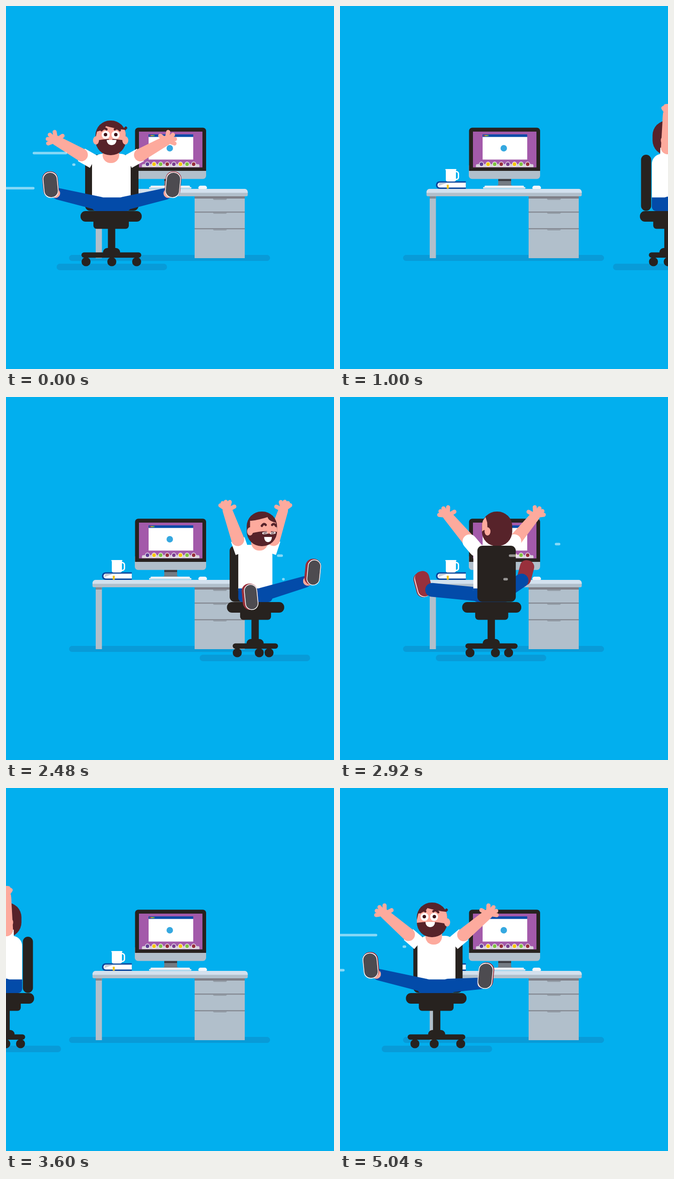
Recreate the animation shown at these times as an HTML page with a canvas. Size 713 by 786 pixels, loop 5080 ms.

```html
<!DOCTYPE html>
<html lang="en">
<head>
<meta charset="utf-8">
<title>Office chair spin</title>
<style>
html, body { margin: 0; width: 100%; height: 100%; overflow: hidden; background: #02afee; }
canvas { display: block; }
</style>
</head>
<body>
<canvas id="stage" width="713" height="786"></canvas>
<script>
const ctx = document.getElementById('stage').getContext('2d');
const LOOP = 5080, STEP = 40, SPEED = 0.4834, TURN = 0.45;
const C = {
  sky: '#02afee', shade: '#089bd8', black: '#27221f', steel: '#b1bfcb', light: '#d3e1ee',
  dark: '#858a93', blue: '#034ba9', skin: '#fdaa9d', hair: '#57232a', pupil: '#3d1218',
  shoe: '#98303c', sole: '#4d4b50', white: '#fff', purple: '#a35aaa'
};

function box(x, y, w, h, color, r = 0) {
  ctx.fillStyle = color;
  ctx.beginPath();
  ctx.roundRect(x, y, w, h, r);
  ctx.fill();
}
function disc(x, y, rx, color, ry = rx) {
  ctx.fillStyle = color;
  ctx.beginPath();
  ctx.ellipse(x, y, rx, ry, 0, 0, Math.PI * 2);
  ctx.fill();
}
function stroke(x1, y1, x2, y2, width, color, cap = 'round') {
  ctx.strokeStyle = color;
  ctx.lineWidth = width;
  ctx.lineCap = cap;
  ctx.beginPath();
  ctx.moveTo(x1, y1);
  ctx.lineTo(x2, y2);
  ctx.stroke();
}
// Limb with different radii at its two round ends
function taper(x1, y1, r1, x2, y2, r2, color) {
  const a = Math.atan2(y2 - y1, x2 - x1), q = Math.PI / 2;
  ctx.fillStyle = color;
  ctx.beginPath();
  ctx.arc(x1, y1, r1, a + q, a - q);
  ctx.arc(x2, y2, r2, a - q, a + q);
  ctx.fill();
}

function drawMonitor() {
  box(344, 374, 28, 15, '#747b83');
  box(344, 374, 28, 5, '#3c3d42');
  box(341, 388, 34, 4, '#747b83', 2);
  box(280, 345, 155, 29.5, C.steel, [0, 0, 7, 7]);
  box(280.5, 263.5, 154.5, 93.5, C.black, [7, 7, 0, 0]);
  box(289, 272, 138, 77.5, C.purple);
  box(310, 278, 97, 54.5, C.white);
  box(310, 278, 97, 5.5, C.blue);
  ['#e0473c', '#f8c31c', '#7dc243'].forEach((c, i) => disc(313.5 + i * 3.8, 280.7, 1.6, c));
  disc(356, 308, 7, '#35a8e0');
  box(295.5, 342.5, 125, 6.5, '#d8d3dc', [3, 3, 0, 0]);
  ['#5f3d94', '#f7c70f', '#7fc241', '#97303c', '#78408f', '#f7c70f', '#7fc241', '#97303c'].forEach((c, i) => {
    disc(307.5 + i * 14.35, 342.5, 5.4, '#f1ecf2');
    disc(307.5 + i * 14.35, 342.5, 3.9, c);
  });
}

function drawDesk() {
  box(137, 539, 437, 13, C.shade, 6.5);
  box(195, 410, 13.5, 136, C.steel);
  box(195, 411, 13.5, 6, C.dark);
  box(410, 410, 109, 136, C.steel);
  box(410, 411, 109, 6, '#7f8088');
  [446, 482].forEach(y => box(410, y - 1, 109, 2.5, C.dark));
  [417, 447, 483].forEach(y => box(450, y, 30, 3, '#949da7', [0, 0, 3, 3]));
  drawMonitor();
  box(188, 396, 337.5, 16, C.steel, [7, 7, 3, 3]);
  box(188, 396, 337.5, 8.5, C.light, [7, 7, 0, 0]);
  box(314, 389, 86, 4, '#f2f5f9', 2);
  box(311, 392, 92, 3.5, '#dbe4ed', 1);
  box(418, 389, 19, 7, '#f4f6fa', [8, 8, 3, 3]);

  box(208.5, 379.5, 65, 16.5, '#0b469c', [8, 0, 0, 8]);
  box(212, 382.5, 61.5, 10.5, C.white, [5, 0, 0, 5]);
  ctx.fillStyle = '#c5ccd6';
  ctx.beginPath();
  ctx.moveTo(213, 390);
  ctx.lineTo(216, 383);
  ctx.lineTo(233, 383);
  ctx.fill();
  box(232, 387, 4.5, 8.5, '#f7c51d');
  ctx.strokeStyle = C.white;
  ctx.lineWidth = 3;
  ctx.beginPath();
  ctx.roundRect(246, 358.5, 11.5, 17, 5);
  ctx.stroke();
  box(230, 354, 22, 26, C.white, [1, 1, 4, 4]);
  box(229, 353, 24, 2.5, C.white, 1);
}

// Geometry for one heading; 0 faces the viewer, 90 faces the right edge
function poseAt(degrees) {
  const yaw = ((degrees + 180) % 360 + 360) % 360 - 180;
  const a = yaw * Math.PI / 180, cos = Math.cos(a), sin = Math.sin(a);
  return { yaw, cos, sin, side: Math.abs(sin), flat: cos * cos, twist: Math.sin(2 * a) };
}

function drawBase(p) {
  const w = 41 + 24 * p.flat;
  box(-120, 558, 240, 14, C.shade, 7);
  box(-8.5, 480, 16, 50, C.black);
  box(-19, 524, 37, 14, C.black, [9, 9, 0, 0]);
  box(-w - 1, 533.5, 2 * w, 11.5, C.black, 5.7);
  [-w + 9 + 10 * Math.abs(p.twist), 10 * p.twist, w - 11].forEach(x => disc(x, 553.7, 9.8, C.black));
  const seat = 60 + 6.5 * p.flat, block = 31 + 7.5 * p.flat;
  box(-block - 1.5, 460, block * 2, 22.5, C.black, 7);
  box(-seat - 1.5, 444, seat * 2, 23, C.black, 11);
}

function drawBackrest(p) {
  const w = 22 + 94 * p.flat;
  const x = -48 * Math.sign(p.sin) * p.side ** 2.6;
  box(x - w / 2, 322, w, 121.5, C.black, 11);
}

function drawTorso(p) {
  const w = 34.5 + 7.5 * p.flat;
  box(-w - 1, 320, 2 * w, 100, C.white, [22, 22, 0, 0]);
  box(-w - 1, 414.5, 2 * w, 29.5, C.blue, [0, 0, 9, 9]);
  box(8.4 * p.twist - 20, 305, 36, 17 + 18 * Math.max(0, p.cos), C.skin, [0, 0, 17, 17]);
}

function drawArm(p, s) {
  const dir = s * Math.sign(p.cos || 1), c = Math.abs(p.cos), behind = p.cos < 0;
  const sx = dir * 38 * Math.sqrt(c) - 2, sy = 337 + 9 * Math.min(0, p.cos);
  const hx = dir * (123 - 3 * p.cos) * c ** 1.3 - 1, hy = 291 - 56 * p.side ** 0.95;
  const angle = Math.atan2(hy - sy, hx - sx), cuff = behind ? 22 : 30;
  const ex = sx + cuff * Math.cos(angle), ey = sy + cuff * Math.sin(angle);
  const spread = 0.3 + 0.7 * c;
  const sleeve = cap => stroke(sx, sy, ex, ey, 31, C.white, cap);
  if (!behind) sleeve('butt');
  taper(ex, ey, 14, hx, hy, 10.5, C.skin);
  [-50, -20, 12, 50, 115].forEach((deg, i) => {
    const f = angle - dir * deg * spread * Math.PI / 180, len = i === 4 ? 17 : 18.5;
    stroke(hx, hy, hx + len * Math.cos(f), hy + len * Math.sin(f), 9, C.skin);
  });
  if (behind) sleeve('round');
}

function legAt(p, s) {
  const reach = 60 + 40 * p.side ** 6, spread = 140 - 7 * p.cos;
  const near = -s * spread * p.sin;
  return {
    s,
    x: s * spread * p.cos * Math.abs(p.cos) ** 0.3 + reach * p.sin,
    y: 387 + (near > 0 ? near * (0.33 + 0.15 * p.cos) : near * 0.07),
    z: reach * p.cos + near
  };
}

function drawFoot(p, leg) {
  const front = p.cos > -0.15, outward = Math.sign(leg.x || 1);
  ctx.save();
  ctx.translate(leg.x, leg.y);
  ctx.rotate(outward * (front ? 0.1 : 0.26));
  if (front) {
    const w = 29 * Math.min(1, 0.3 + Math.max(0, p.cos));
    const shift = 3 * p.sin;
    box(-17, -29, 34, 57, C.shoe, 16);
    box(shift - w / 2 - 1.5, -27.5, w + 3, 56, C.white, 15);
    box(shift - w / 2, -26, w, 53, C.sole, 14);
  } else {
    // Only the shoe turned away from the far side shows its sole
    if (leg.x * p.sin > 0) {
      box(outward * 2 - 13, -26, 30, 54, C.shoe, 14);
      box(outward - 14, -26, 30, 54, '#f0dcdc', 14);
    }
    box(-16, -28, 31, 55, C.shoe, 14);
  }
  ctx.restore();
}

function drawLeg(p, leg) {
  const behind = p.cos < 0, drop = behind ? 11 : 16;
  const hx = leg.s * 26 * p.cos, hy = 428;
  const at = k => [leg.x + (hx - leg.x) * k, leg.y + drop + (hy - leg.y - drop) * k];
  const [ax, ay] = at(0.15);
  if (behind) drawFoot(p, leg);
  taper(hx, hy, 15, ax, ay, behind ? 15 : 12.5, C.blue);
  if (behind) return;
  const [bx, by] = at(0.1), [cx, cy] = at(0.03);
  stroke(bx, by, cx, cy, 20, C.skin);
  stroke(...at(0.07), cx, cy, 19, C.white, 'butt');
  drawFoot(p, leg);
}

function drawFace(p) {
  const x = 19 * p.sin, squint = p.side > 0.55, drop = squint ? 10 : 0;
  const narrow = 0.45 + 0.55 * p.cos;
  [-1, 1].forEach(s => {
    const ex = x + s * 10.7 * narrow;
    ctx.strokeStyle = C.hair;
    ctx.lineWidth = 5;
    ctx.lineCap = 'round';
    ctx.beginPath();
    ctx.moveTo(x + s * 9 * narrow, 267 + drop);
    ctx.quadraticCurveTo(x + s * 14 * narrow, 262 + drop, x + s * 20 * narrow, 269 + drop);
    ctx.stroke();
    if (squint) {
      stroke(ex - 4, 294, ex + 4, 295, 4.5, C.white);
      stroke(ex - 3, 294, ex + 3, 295, 1.5, C.pupil);
    } else {
      disc(ex, 279, 8.8 * narrow, C.white, 8.8);
      disc(ex + s * 0.5, 278.5, 3.8, C.pupil);
    }
  });
  disc(x, 287 + drop / 2, 4.5, C.skin, 4);
  const sw = 10.5 * (0.5 + 0.5 * p.cos), sy = 290 + drop * 1.3;
  ctx.fillStyle = C.white;
  ctx.beginPath();
  ctx.moveTo(x + 2 - sw, sy);
  ctx.lineTo(x + 2 + sw, sy);
  ctx.bezierCurveTo(x + 2 + sw, sy + 15, x + 2 - sw, sy + 15, x + 2 - sw, sy);
  ctx.fill();
}

function drawHead(p) {
  const rad = Math.PI / 180, R = 33, EAR = 105;
  ctx.save();
  ctx.translate(14 * p.twist - 1 - 1.5 * p.cos, 0);
  const tuft = 32 * p.cos;
  if (p.cos > 0) stroke(tuft - 3, 268, tuft + 1, 264, 6, C.hair);
  ctx.save();
  ctx.beginPath();
  ctx.roundRect(-R, 248, 2 * R, 75, 32);
  ctx.fillStyle = C.hair;
  ctx.fill();
  ctx.clip();
  const lo = Math.max(-90, p.yaw - EAR), hi = Math.min(90, p.yaw + EAR);
  if (hi > lo) {
    const l = R * Math.sin(lo * rad), r = R * Math.sin(hi * rad), part = l + (r - l) * 0.35;
    const low = 292 + 8 * Math.max(0, p.cos) * p.side;
    ctx.fillStyle = C.skin;
    ctx.beginPath();
    ctx.moveTo(l, 286);
    ctx.lineTo(l + (r - l) * 0.05, 272);
    ctx.quadraticCurveTo(part - 4 * p.flat, 268, part, 260);
    ctx.quadraticCurveTo(part + (r - part) * 0.7, 268, r, 268);
    ctx.lineTo(r, low);
    ctx.quadraticCurveTo((l + r) / 2, low - 8, l, 292);
    ctx.fill();
  }
  if (p.cos > -0.05) drawFace(p);
  ctx.restore();
  [-EAR, EAR].forEach(offset => {
    const e = (p.yaw + offset) * rad;
    if (Math.cos(e) > -0.35) disc(R * Math.sin(e), 291, 6.5, C.skin, 9);
  });
  ctx.restore();
}

function drawRider(u) {
  const p = poseAt(u * TURN);
  const legs = [-1, 1].map(s => legAt(p, s)).sort((a, b) => a.z - b.z);
  const near = p.sin > 0 ? -1 : 1, behind = p.cos < 0;
  ctx.save();
  ctx.translate(230 + SPEED * u, 0);
  drawBase(p);
  if (!behind) drawBackrest(p);
  if (behind) legs.forEach(l => drawLeg(p, l));
  drawArm(p, -near);
  drawTorso(p);
  if (!behind) legs.forEach(l => drawLeg(p, l));
  drawHead(p);
  drawArm(p, near);
  if (behind) drawBackrest(p);
  ctx.restore();
}

// Speed lines: height, then [time, tail, head] keys
const STREAKS = [
  [318.5, [-100, -40, -20], [-40, -4, 81], [0, 58, 133], [120, 148, 222], [320, 234, 246], [360, 249, 249]],
  [343.5, [-280, 0, 0], [-200, 55, 100], [-120, 111, 124], [-40, 136, 144], [0, 144, 151], [40, 154, 154]],
  [343.5, [80, 170, 170], [160, 195, 262], [240, 265, 316], [320, 325, 346], [440, 372, 378], [480, 383, 383]],
  [394.5, [-280, 0, 0], [-200, 68, 98], [-120, 107, 113], [-80, 116, 116]],
  [394.5, [-80, -50, -42], [-40, -45, 10], [0, -12, 62], [160, 160, 235], [320, 348, 358], [360, 366, 366]]
];
function drawStreaks(u) {
  STREAKS.forEach(([y, ...keys]) => {
    const i = keys.findIndex(k => k[0] > u);
    if (i < 1) return;
    const a = keys[i - 1], b = keys[i], k = (u - a[0]) / (b[0] - a[0]);
    const tail = a[1] + (b[1] - a[1]) * k, head = a[2] + (b[2] - a[2]) * k;
    box(tail, y - 2.7, head - tail, 5.4, 'rgba(255,255,255,.52)', 2.7);
  });
}

function drawPass(u) {
  drawRider(u);
  drawStreaks(u);
}

function frame(now) {
  const t = Math.floor((now % LOOP) / STEP) * STEP;
  ctx.fillStyle = C.sky;
  ctx.fillRect(0, 0, 713, 786);
  drawDesk();
  if (t < 1360) drawPass(t);
  else if (t >= 4280) drawPass(t - LOOP);
  else if (t >= 1800 && t < 3960) {
    ctx.save();
    ctx.translate(713, 0);
    ctx.scale(-1, 1);
    drawPass(t - 2600);
    ctx.restore();
  }
}

const start = performance.now();
function tick() {
  frame(performance.now() - start);
  requestAnimationFrame(tick);
}
tick();
</script>
</body>
</html>
```
